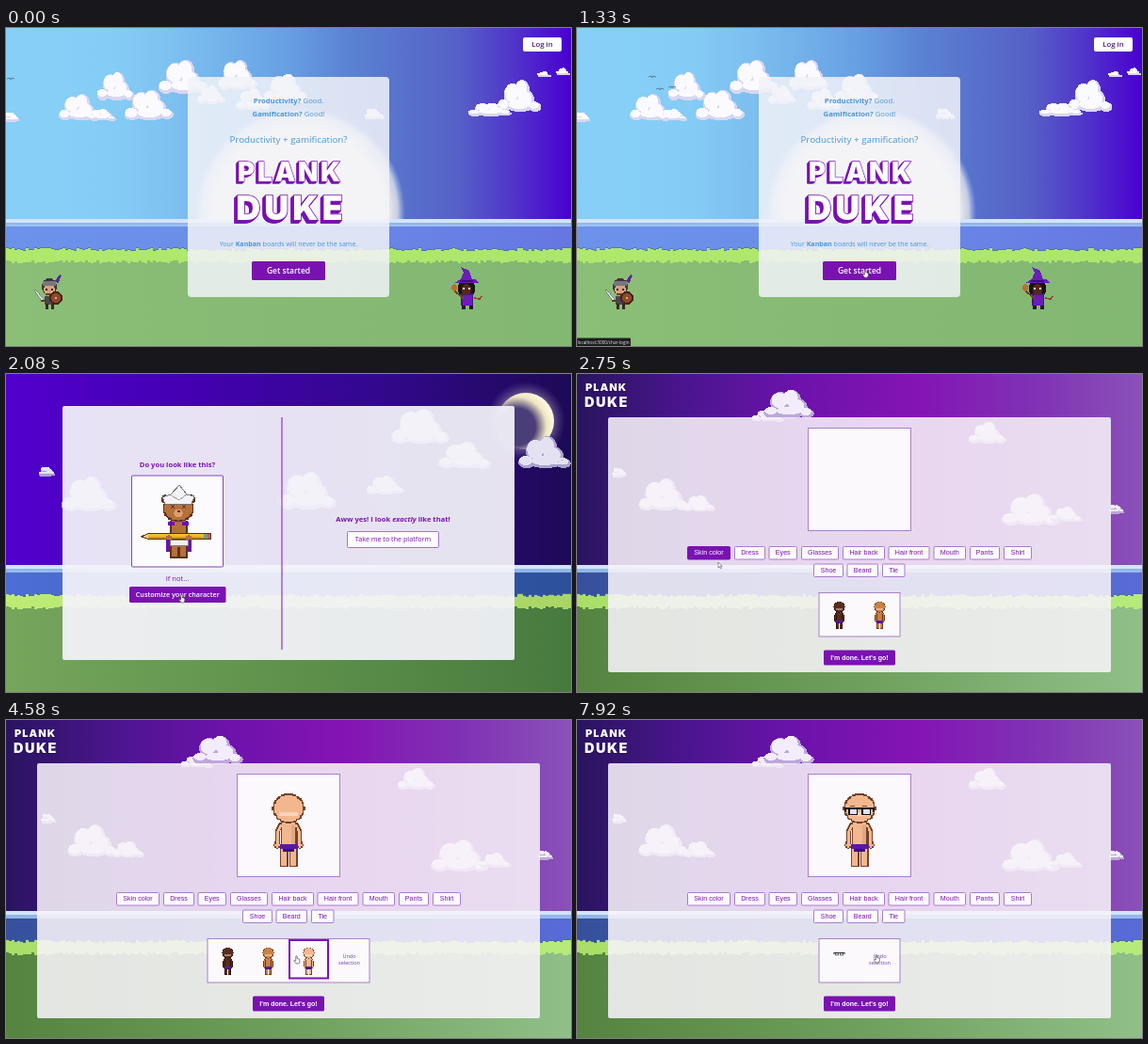
Animation of 600x338 px, one loop 8000 ms. Source, as an HTML page:

```html
<!DOCTYPE html>
<html lang="en">
<head>
<meta charset="utf-8">
<title>Character builder</title>
<style>
html, body { margin: 0; width: 100%; height: 100%; overflow: hidden; background: #333; }
svg { display: block; width: 100vw; height: 100vh; }
text { font-family: "Open Sans", sans-serif; text-anchor: middle; }
.ui { font-family: "Liberation Sans", Arial, sans-serif; }
.word { font-family: Inter, sans-serif; font-weight: 900; }
.pix { shape-rendering: crispEdges; }
</style>
</head>
<body>
<svg id="stage" viewBox="0 0 600 338" preserveAspectRatio="none"></svg>
<script>
const PURPLE = '#7a12b2';
const LOOP = 8000, STEP = 1000 / 12;
const stage = document.getElementById('stage');

// Drawing helpers
const rect = (x, y, w, h, fill, more = '') =>
  `<rect x="${x}" y="${y}" width="${w}" height="${h}" fill="${fill}" ${more}/>`;
const path = (d, fill, more = '') => `<path d="${d}" fill="${fill}" ${more}/>`;
const text = (s, x, y, size, fill, weight = 400, more = '') =>
  `<text x="${x}" y="${y}" font-size="${size}" fill="${fill}" font-weight="${weight}" ${more}>${s}</text>`;
const group = (x, y, s, body, cls = 'pix') =>
  `<g transform="translate(${x} ${y}) scale(${s})" class="${cls}">${body}</g>`;
const gradient = (id, colors) => `<linearGradient id="${id}">` +
  colors.map((c, i) => `<stop offset="${i / (colors.length - 1)}" stop-color="${c}"/>`).join('') +
  '</linearGradient>';

// Ellipse built from stepped rows
function blob(cx, cy, rx, ry, fill, cell = 1.35) {
  let d = '';
  for (let y = -ry; y < ry; y += cell) {
    const k = (y + cell / 2) / ry;
    const w = Math.round(rx * Math.sqrt(Math.max(0, 1 - k * k)) / cell) * cell;
    if (w) d += `M${cx - w} ${cy + y}h${2 * w}v${cell}h${-2 * w}z`;
  }
  return path(d, fill);
}

function random(seed) {
  return () => (seed = (seed * 16807) % 2147483647) / 2147483647;
}

const PUFFS = [[-.34, .28, .16, .18], [-.16, -.06, .2, .34], [.06, -.16, .18, .32],
  [.16, .12, .2, .3], [.36, .3, .14, .15], [.02, .28, .32, .18]];
function cloud(x, y, w, h, light, shade) {
  const puffs = (dx, dy, k, fill) => PUFFS.map(([px, py, rx, ry]) =>
    blob(Math.round(x + px * w + dx), Math.round(y + py * h + dy), rx * w * k, Math.round(ry * h * k), fill, 1)).join('');
  return `<g class="pix">${puffs(0, 0, 1, shade)}${puffs(-1, -2, .78, light)}</g>`;
}

function grass(fill) {
  const rnd = random(77);
  let top = 'M0 247', bottom = '';
  for (let x = 0; x < 600; x += 3) {
    top += `L${x} ${Math.round(234 + rnd() * 3)}h3`;
    bottom = `L${x + 3} ${Math.round(247 + rnd() * 3)}h-3` + bottom;
  }
  const d = top + bottom + 'z';
  return `<g class="pix">${path(d, '#4f6f8c', 'transform="translate(0 -1)" opacity=".7"')}${path(d, fill)}</g>`;
}

function landscape(id, sky, sea, blades, ground, extra) {
  return `<defs>${gradient(id + 'sky', sky)}${gradient(id + 'sea', sea)}` +
    `${gradient(id + 'blade', blades)}${gradient(id + 'land', ground)}</defs>` +
    rect(0, 0, 600, 206, `url(#${id}sky)`) + extra +
    rect(0, 203, 600, 36, `url(#${id}sea)`) +
    rect(0, 203, 600, 4, '#d3e3f8') + rect(0, 207, 600, 2, '#8fb6ee') +
    rect(0, 209, 600, 2, '#a9cdf5', 'opacity=".8"') +
    rect(0, 242, 600, 96, `url(#${id}land)`) + grass(`url(#${id}blade)`);
}

function word(s, x, y, size, depth, face, edge, spacing) {
  const style = `class="word" letter-spacing="${spacing}" stroke="${edge}" stroke-width="${size / 24}" paint-order="stroke"`;
  let out = '';
  for (let d = depth; d > 0; d -= .5) out += text(s, x - d, y + d, size, edge, 900, style);
  return out + text(s, x, y, size, face, 900, style);
}

const button = (s, x, y, w, h, size, more = '', weight = 600) =>
  rect(x, y, w, h, PURPLE, 'rx="1.5"') +
  text(s, x + w / 2, y + h / 2 + size * .34, size, '#fff', weight, more);

// Characters
const SKINS = [['#5a2c1c', '#2c120c'], ['#c98148', '#6b3718'], ['#f2b78f', '#74422a']];

function eyes() {
  return [-7, 6].map(x => rect(x - 3, -25, 6, 7, '#fff') + rect(x - 1, -24, 3, 5, '#30306c') +
    rect(x - 3, -27, 5, 1.4, '#7a4a30')).join('');
}

function glasses() {
  return [-12, 2].map(x => rect(x, -25, 10, 8, '#111') + rect(x + 1.5, -23, 7, 4.5, '#dfe3f4')).join('') +
    rect(-16, -25, 32, 2, '#111') + rect(-16, -25, 2, 5, '#111') + rect(14, -25, 2, 5, '#111');
}

function figure([skin, line], extras = '') {
  const limbs = [-1, 1].map(s =>
    path(`M${s * 6} -9h${s * 4}l${s * 4} 8v16h${s * -5}v-14z`, line) + blob(s * 12, 15, 3.8, 4, line) +
    path(`M${s * 6} -7h${s * 3}l${s * 3.6} 7v14h${s * -2.6}v-13z`, skin) + blob(s * 12, 15, 2.7, 2.7, skin) +
    rect(s * 5 - 4.5, 17, 9, 21, line) + rect(s * 5 - 3, 18, 6, 18.5, skin)).join('');
  return limbs + rect(-8.5, -4, 17, 22, line) + rect(-7, -10, 14, 27, skin) +
    rect(3, -6, 4, 22, '#000', 'opacity=".08"') +
    blob(0, -24, 17, 16, line) + blob(0, -24, 15, 14.4, skin) +
    rect(-10, -20, 20, 4, '#fff', 'opacity=".4"') +
    rect(-9.5, 14, 19, 5, '#5a18a4') + rect(-6, 19, 12, 3, '#3f0d7c') + extras;
}

function paperHatBear() {
  const fur = '#b5703c', line = '#5c3218';
  const cross = x => path(`M${x - 2} -17l4 4m0 -4l-4 4`, 'none', `stroke="${line}"`);
  return rect(-13, 20, 27, 13, '#6a12a8') + rect(-9, 0, 19, 40, line) + rect(-7, 0, 15, 28, fur) +
    rect(-7, 28, 6, 10, fur) + rect(2, 28, 6, 10, fur) +
    blob(-14, -23, 4, 5, line) + blob(14, -23, 4, 5, line) +
    blob(0, -13, 16.5, 14, line) + blob(0, -13, 15, 12.5, fur) + cross(-6) + cross(6) +
    blob(0, -8, 5, 4, '#dba06c') + rect(-1.5, -11, 3, 2, line) +
    rect(-11, 1, 7, 4, '#6a12a8') + rect(4, 1, 7, 4, '#6a12a8') +
    rect(-9, 20, 19, 6, '#f4f0f0', 'stroke="#877"') +
    path('M-17 -25l9 -3l9 -10l8 10l8 2l-3 8h-28z', '#f3f3f6', 'stroke="#777"') +
    path('M-8 -27l9 5l8 -6', 'none', 'stroke="#aaa"') +
    path('M-41 17l9 -4h67v7h-67z', '#4f3a14') + path('M-38 17l6 -3v5z', '#edcc9b') +
    rect(-32, 14, 59, 5, '#f3bc2b') + rect(-32, 17, 59, 2, '#d3931c') +
    rect(27, 14, 4, 5, '#7a9a86') + rect(31, 14, 3, 5, '#c8576c') +
    blob(-10, 18, 3, 3, fur) + blob(11, 18, 3, 3, fur);
}

function knight() {
  return rect(-5, 3, 10, 9, '#4c4650') + rect(-4, 11, 3, 6, '#3a2822') + rect(2, 11, 3, 6, '#3a2822') +
    blob(0, -7, 8, 9, '#3c3638', 1) + blob(0, -4, 6, 6, '#d9a27c', 1) +
    rect(-7, -13, 14, 5, '#77777f') + path('M6 -13l5 -7l2 1l-4 9z', '#5a2a90') +
    rect(-4, -5, 2, 2, '#222') + rect(2, -5, 2, 2, '#222') + rect(-4, 0, 8, 2, '#6d3b2a') +
    path('M-15 -4l9 10l-2 2l-8 -11z', '#dfe6ee', 'stroke="#555" stroke-width=".6"') +
    rect(-9, 7, 5, 2, '#5a3a20') +
    blob(7, 5, 7, 7, '#4a2416', 1) + blob(7, 5, 5, 5, '#8f4a2a', 1) + rect(6, 4, 2, 2, '#d0b080');
}

function wizard() {
  return blob(0, -2, 9, 11, '#1d1114', 1) + rect(-6, 3, 13, 13, '#4a128c') + rect(-4, 5, 10, 11, '#6a1db8') +
    rect(-5, 16, 4, 4, '#2a1430') + rect(3, 16, 4, 4, '#2a1430') + blob(0, -1, 5, 6, '#54291c', 1) +
    rect(-4, -3, 2, 2, '#fff') + rect(2, -3, 2, 2, '#fff') +
    path('M-13 -8h26l-4 -4h-3l-3 -9l-9 -4l3 6l-3 7z', '#6a1db8') + rect(-7, -11, 14, 2, '#3d0f78') +
    path('M-14 -1l11 10', 'none', 'stroke="#71421f" stroke-width="2"') + blob(-13, -3, 3, 4, '#b9702e', 1) +
    path('M8 8l6 1l2 -3', 'none', 'stroke="#a43a2a" stroke-width="1.5"');
}

// Pages
const at = (list, light, shade) => list.map(c => cloud(...c, light, shade)).join('');
const birds = [[80, 53], [88, 66], [101, 64]].map(([x, y]) =>
  path(`M${x - 4} ${y - 1}l3 -1l1 2l1 -2l3 1`, 'none', 'stroke="#56688c" stroke-width=".8"')).join('');

function welcomePage() {
  const sun = `<radialGradient id="sun"><stop offset=".8" stop-color="#fffbe9"/>
    <stop offset=".93" stop-color="#e8e9ee" stop-opacity=".75"/><stop offset="1" stop-color="#b9c8f0" stop-opacity="0"/></radialGradient>
    <circle cx="312" cy="196" r="112" fill="url(#sun)"/>`;
  const clouds = at([[78, 85, 44, 30], [102, 93, 30, 12], [117, 62, 40, 32], [152, 82, 52, 34], [188, 52, 52, 38],
    [218, 71, 30, 20], [246, 50, 42, 34], [262, 76, 36, 24], [297, 64, 46, 32], [6, 95, 18, 9],
    [391, 92, 22, 10], [545, 73, 46, 36], [514, 87, 46, 14], [572, 50, 14, 4], [592, 47, 14, 8]], '#fbfaff', '#d9d6f2');
  const blue = '#4796d4';
  return landscape('w', ['#87cff7', '#86cff7', '#84ccf5', '#7dc0f0', '#72b0ea', '#679fe2',
    '#5b84d4', '#5872cc', '#5660c6', '#5034ca', '#4a00d0'],
    ['#6d92ea', '#6a8de8', '#6676e2'], ['#aee96c', '#ace66c'], ['#8bbf78', '#86ba74', '#83b872'],
    sun + clouds + `<g id="birds">${birds}</g>`) +
    group(46, 282, 1, knight()) + group(489, 279, 1, wizard()) +
    rect(193, 52, 214, 234, '#f3f4f9', 'rx="4" opacity=".85"') +
    text('<tspan font-weight="700">Productivity?</tspan> Good.', 300, 80, 7.7, blue) +
    text('<tspan font-weight="700">Gamification?</tspan> Good!', 300, 94, 7.7, blue) +
    text('Productivity + gamification?', 300, 122, 9.8, blue) +
    word('PLANK', 302, 162.5, 28, 2.5, '#fff', PURPLE, 2.5) +
    word('DUKE', 303, 204, 36, 3, '#fff', PURPLE, 4) +
    text('Your <tspan font-weight="700">Kanban</tspan> boards will never be the same.', 300, 231.5, 7.1, blue) +
    button('Get started', 261, 248, 78, 20, 8.5) +
    rect(549, 10, 41, 15, '#fff', 'rx="2"') + text('Log in', 569.5, 20.2, 7.8, '#4b1a80', 600);
}

function introPage() {
  const moon = `<radialGradient id="glow"><stop offset=".45" stop-color="#fff6c8" stop-opacity=".7"/>
    <stop offset="1" stop-color="#8a80c0" stop-opacity="0"/></radialGradient>
    <radialGradient id="moon" cx=".34" cy=".6" r=".66"><stop offset=".5" stop-color="#4a3d78"/>
    <stop offset=".8" stop-color="#efe5c2"/><stop offset="1" stop-color="#fff9df"/></radialGradient>
    <circle cx="552" cy="50" r="42" fill="url(#glow)"/><circle cx="552" cy="50" r="30" fill="url(#moon)"/>`;
  const clouds = at([[44, 104, 18, 9], [88, 128, 58, 40], [440, 56, 62, 40], [487, 87, 56, 30],
    [320, 124, 60, 42], [403, 118, 40, 20], [572, 84, 56, 36], [588, 95, 16, 8]], '#e4e2f2', '#a9a3cf');
  return landscape('i', ['#5200ce', '#4300b0', '#32088c', '#1d0a55'], ['#4d6ed6', '#3d5cb8', '#2c509a'],
    ['#bdec74', '#a8d564'], ['#76a65c', '#5f914c', '#477a3e'], moon + clouds) +
    rect(60, 34, 480, 270, '#f5f4fa', 'rx="2" opacity=".93"') +
    rect(292.4, 46, 1.2, 247, '#8a3cc0') +
    text('Do you look like this?', 182, 99.3, 7.6, PURPLE, 700) +
    rect(133.5, 108, 97, 97, '#fbfafc', 'stroke="#8448b0" rx="1"') + group(183, 156, 1, paperHatBear()) +
    text('If not...', 182, 219.5, 7.6, PURPLE) +
    button('Customize your character', 131, 226, 102.5, 17, 7.2) +
    text('Aww yes! I look <tspan font-style="italic">exactly</tspan> like that!', 411, 157, 7.6, PURPLE, 700) +
    rect(362.5, 167.5, 97, 17, '#fcfbfd', 'stroke="#a574c8" rx="1"') +
    text('Take me to the platform', 411, 178.4, 7.2, PURPLE, 500);
}

const TABS = [['Skin color', 117, 46], ['Dress', 167, 33], ['Eyes', 203.5, 30.5], ['Glasses', 238, 40],
  ['Hair back', 282, 45], ['Hair front', 330.5, 44], ['Mouth', 378.5, 34.5], ['Pants', 417, 32], ['Shirt', 453, 30],
  ['Shoe', 251, 32], ['Beard', 286.5, 33.5], ['Tie', 324, 24.5]].map(([label, x, w], i) =>
  ({ label, x, w, y: i < 9 ? 183 : 201.5, h: 14.5 }));

function builderPage() {
  const clouds = at([[203, 45, 34, 12], [225, 32, 54, 32], [45, 105, 16, 9], [92, 129, 54, 36], [130, 138, 34, 18],
    [436, 63, 40, 24], [482, 145, 62, 36], [520, 150, 34, 16], [573, 144, 16, 9]], '#f3ecfa', '#bda6dc');
  return landscape('b', ['#29145f', '#4c1590', '#6e12ac', '#8414b4', '#8030b4', '#8a52b8'],
    ['#35509c', '#4a5fb4', '#596bd8'], ['#a9de68', '#b6ea7a'], ['#548440', '#6f9f5c', '#90c088'], clouds) +
    word('PLANK', 31, 18, 11, 1, '#fff', '#2a1262', 1) + word('DUKE', 31.5, 35, 14.5, 1, '#fff', '#2a1262', 1.5) +
    rect(33, 46, 534, 271, '#f8f4fa', 'rx="2" opacity=".87"') +
    rect(245.5, 57.5, 109, 109, '#fbf9fc', 'stroke="#ab7fcb"') + '<g id="preview"></g><g id="tabs"></g><g id="options"></g>' +
    button('I\'m done. Let\'s go!', 262, 293.5, 76, 16, 7, 'class="ui"', 700);
}

// Builder state: [time, changes]
const STATES = [[0, { kind: '', count: 0, skin: -1, chosen: false, extra: '' }],
  [2660, { kind: 'skin', count: 2 }], [2825, { count: 3 }],
  [3240, { skin: 0, chosen: true }], [3740, { skin: 1 }], [4240, { skin: 2 }],
  [5160, { kind: 'eyes', count: 4, chosen: false }], [5910, { chosen: true, extra: 'eyes' }],
  [6990, { kind: 'glasses', count: 1, chosen: false }], [7825, { chosen: true, extra: 'glasses' }]];
const EXTRAS = { eyes, glasses: () => eyes() + glasses() };
const PAGE_STARTS = [0, 1415, 2330];

// Pointer tip: [time, x, y]
const POINTER = [[0, 332, 345], [350, 330, 342], [1000, 306, 257], [1670, 306, 257.5], [2100, 186, 235], [2330, 186, 235],
  [2580, 146, 190], [2670, 147, 191], [2750, 150, 200], [3080, 256, 252], [3250, 257, 253], [3600, 278, 253],
  [3760, 278, 253], [4080, 312, 252], [4580, 308.5, 251], [4750, 308.5, 251], [5080, 218, 189], [5250, 218, 190],
  [5580, 300, 254], [5830, 350.5, 256.5], [6500, 350.5, 256.5], [6910, 257, 190], [7080, 258, 190],
  [7500, 312, 249], [7750, 318, 250], [8000, 318, 250]];

function pointerAt(t) {
  const i = Math.max(1, POINTER.findIndex(p => p[0] > t));
  const [t0, x0, y0] = POINTER[i - 1], [t1, x1, y1] = POINTER[i];
  const k = (t - t0) / (t1 - t0), e = k * k * (3 - 2 * k);
  return [x0 + (x1 - x0) * e, y0 + (y1 - y0) * e];
}

const inside = ([px, py], { x, y, w, h }, pad = 0) => px >= x && px <= x + w && py >= y && py <= y + h + pad;

function optionIcon(kind, i) {
  if (kind === 'skin') return figure(SKINS[i]);
  if (kind === 'glasses') return glasses();
  return [-8, 8].map(x => rect(x - 4, -23, i < 2 ? 8 : 3, 3, '#39313c') +
    rect(x - 1, -20 + i % 2, 4, i === 1 ? 2 : 4, '#39313c')).join('');
}

function optionsView({ kind, count, chosen }, hover) {
  if (!kind) return '';
  const cells = count + (chosen ? 1 : 0), left = 300 - cells * 21.5;
  let out = rect(left, 232.5, cells * 43, 46.5, '#fbf9fc', 'stroke="#ab7fcb"');
  for (let i = 0; i < count; i++) {
    const x = left + i * 43;
    out += group(x + 21.5, 256.5, .37, optionIcon(kind, i), kind === 'skin' ? 'pix' : '');
    if (i === hover) out += rect(x + 1, 234, 41, 40.5, 'none', `stroke="${PURPLE}" stroke-width="2"`);
  }
  if (chosen) {
    const x = left + count * 43 + 21.5;
    out += text('Undo', x, 253, 5.5, '#6a3a9c') + text('selection', x, 260.3, 5.5, '#6a3a9c');
  }
  return out;
}

const tabsView = lit => TABS.map(({ label, x, y, w, h }, i) =>
  rect(x + .5, y + .5, w - 1, h - 1, i === lit ? PURPLE : '#fcfafd', `stroke="${i === lit ? PURPLE : '#a87cca'}" rx="1"`) +
  text(label, x + w / 2, y + 9.4, 7.15, i === lit ? '#fff' : PURPLE, 400, 'class="ui"')).join('');

stage.innerHTML = [welcomePage, introPage, builderPage].map(p => `<g class="page">${p()}</g>`).join('') +
  `<g id="status">${rect(0, 329.5, 57, 9, '#1d1d20', 'rx="1"')}${text('localhost:3000/char-login', 28, 335.6, 4.7, '#eee')}</g>` +
  `<g id="pointer"><g id="arrow">${path('M0 0v6l1.4 -1.2l1 2l1 -.5l-1 -2h1.8z', '#fff', 'stroke="#555" stroke-width=".6"')}</g>` +
  `<g id="hand">${path('M-.7 0q.8 -.8 1.4 0v2.5l2.6 .8v2.8l-1 1.8h-2.8l-2.3 -3l.6 -.7l1.5 .8z', '#fff', 'stroke="#333" stroke-width=".6"')}</g></g>`;

const find = id => document.getElementById(id);
const pages = stage.querySelectorAll('.page');
const shown = {};
const show = (el, on) => { el.style.display = on ? '' : 'none'; };
const move = (id, x, y) => find(id).setAttribute('transform', `translate(${x} ${y})`);
function fill(id, html) {
  if (shown[id] !== html) find(id).innerHTML = shown[id] = html;
}

const LINKS = [{ x: 261, y: 248, w: 78, h: 20 }, { x: 131, y: 226, w: 102.5, h: 17 }];

function render(time) {
  const t = Math.floor((time + 5) / STEP) * STEP;
  const page = PAGE_STARTS.filter(s => s <= t).length - 1;
  const tip = pointerAt(t);
  let hand = page < 2 && inside(tip, LINKS[page]);
  pages.forEach((el, i) => show(el, i === page));
  show(find('status'), (page === 0 && hand) || (page === 1 && t < 1670));
  move('birds', t * .072 - 96, -9 * Math.cos(t / 850));

  if (page === 2) {
    const state = Object.assign({}, ...STATES.filter(s => s[0] <= t).map(s => s[1]));
    const cells = state.count + (state.chosen ? 1 : 0);
    const box = { x: 300 - cells * 21.5, y: 232.5, w: cells * 43, h: 46.5 };
    const overBox = cells > 0 && inside(tip, box);
    hand = overBox || TABS.some(tab => inside(tip, tab));
    fill('tabs', tabsView(TABS.findIndex(tab => inside(tip, tab, 3))));
    fill('options', optionsView(state, overBox ? Math.floor((tip[0] - box.x) / 43) : -1));
    const extra = EXTRAS[state.extra];
    fill('preview', state.skin < 0 ? '' : group(300, 118, 1, figure(SKINS[state.skin], extra ? extra() : '')));
  }
  show(find('hand'), hand);
  show(find('arrow'), !hand);
  move('pointer', ...tip);
}

let start;
function tick(now) {
  start ??= now;
  render((now - start) % LOOP);
  requestAnimationFrame(tick);
}
render(0);
requestAnimationFrame(tick);
</script>
</body>
</html>
```
